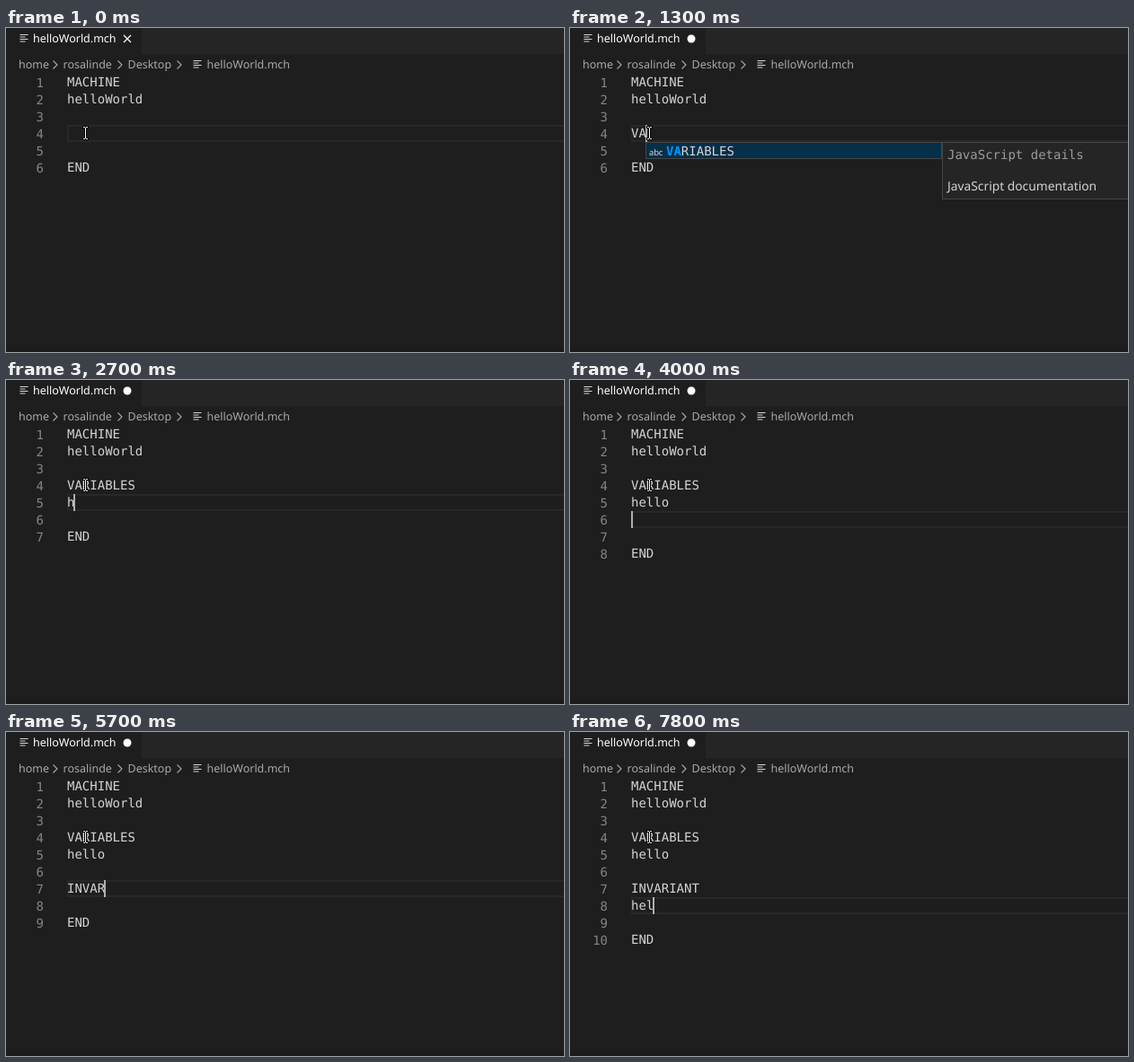
An HTML page for the animation above (8 s loop, 621x361 px).

```html
<!DOCTYPE html>
<html lang="en">
<head>
<meta charset="utf-8">
<title>Editor</title>
<style>
html, body { margin: 0; width: 100%; height: 100%; overflow: hidden; background: #1e1e1e; }
#stage { position: absolute; left: 0; top: 0; width: 621px; height: 361px; overflow: hidden; text-rendering: geometricPrecision; }
#stage div, #stage svg { position: absolute; }
.mono { font: 14px/19px "DejaVu Sans Mono", monospace; color: #d4d4d4; white-space: pre; }
.ui { font: 12.5px/22px "Noto Sans", sans-serif; color: #a9a9a9; white-space: pre; }
.crumb { top: 30px; }
#tabs { left: 151px; top: 0; width: 470px; height: 29px; background: #252526; }
#foot { left: 0; top: 356px; width: 621px; height: 5px; background: #1b1b1b; }
#active { left: 68px; width: 570px; height: 19px; box-sizing: border-box; border: 2px solid #282828; }
#nums { left: 0; top: 53px; width: 42px; text-align: right; color: #858585; }
#text { left: 68px; top: 52px; }
#caret { width: 2px; height: 19px; background: #aeafad; }
#popup { top: 127px; }
#list { left: 0; top: 0; width: 330px; height: 19px; box-sizing: border-box; border: 1px solid #454545; background: #062f4a; }
#list b { color: #0097fb; }
#abc { left: 3px; top: 1px; font: 9.5px/19px "Noto Sans", sans-serif; letter-spacing: -.2px; color: #d4d4d4; }
#word { left: 22px; top: 1px; }
#info { left: 330px; top: 0; width: 330px; height: 64px; box-sizing: border-box; border: 1px solid #454545; background: #252526; }
</style>
</head>
<body>
<div id="stage">
  <div id="tabs"></div>
  <div id="foot"></div>
  <div class="ui" style="left:30px;top:1px;color:#fff">helloWorld.mch</div>
  <div class="ui crumb" style="left:14px">home</div>
  <div class="ui crumb" style="left:63.5px">rosalinde</div>
  <div class="ui crumb" style="left:135.5px">Desktop</div>
  <div class="ui crumb" style="left:223.5px">helloWorld.mch</div>
  <svg width="621" height="361" fill="none">
    <defs>
      <path id="file" d="M0 .5h9M0 3h6M0 5.5h9M0 8h6"/>
      <path id="chev" d="M-2.5 -4.5L2 0L-2.5 4.5"/>
    </defs>
    <g stroke="#d4d7d6">
      <use href="#file" x="15.5" y="7"/>
      <use href="#file" x="208.5" y="36"/>
    </g>
    <g stroke="#a9a9a9" stroke-width="1.1">
      <use href="#chev" x="55" y="41"/>
      <use href="#chev" x="127" y="41"/>
      <use href="#chev" x="193" y="41"/>
    </g>
    <path id="close" d="M131 8l8 8M139 8l-8 8" stroke="#fff" stroke-width="1.2"/>
    <circle id="dot" cx="135" cy="12" r="4.5" fill="#fff"/>
  </svg>
  <div id="active"></div>
  <div id="nums" class="mono"></div>
  <div id="text" class="mono"></div>
  <div id="caret"></div>
  <div id="popup">
    <div id="list">
      <div id="abc">abc</div>
      <div id="word" class="mono"><b></b><span></span></div>
    </div>
    <div id="info">
      <div class="mono" style="left:5px;top:5px;color:#9b9b9b">JavaScript details</div>
      <div class="ui" style="left:5px;top:38px;font-size:13.8px;color:#d4d4d4">JavaScript documentation</div>
    </div>
  </div>
  <svg width="621" height="361" fill="none" stroke-linecap="square">
    <defs>
      <path id="beam" d="M86.5 110.5h1M89.5 110.5h1M88.5 111.5v11M86.5 123.5h1M89.5 123.5h1"/>
    </defs>
    <use href="#beam" stroke="#000" stroke-width="3"/>
    <use href="#beam" stroke="#fff"/>
  </svg>
</div>
<script>
const LOOP = 8000, BLINK = 500, ROW = 19, TOP = 51, LEFT = 68, CHAR = 8.43;
const WORD = 'VARIABLES';
const keys = [
  [1200, 'V'], [1300, 'A'], [1800, 'RIABLES'], [2200, '\n'],
  [2700, 'h'], [2900, 'e'], [3100, 'l'], [3200, 'l'], [3700, 'o'],
  [4000, '\n'], [4200, '\n'],
  [4800, 'I'], [5200, 'N'], [5400, 'V'], [5500, 'A'], [5700, 'R'],
  [6000, 'I'], [6200, 'A'], [6500, 'N'], [6700, 'T'], [7200, '\n'],
  [7500, 'h'], [7700, 'e'], [7800, 'l']
];
const $ = id => document.getElementById(id);
const show = (el, on) => { el.style.visibility = on ? 'visible' : 'hidden'; };

function render(t) {
  const typed = keys.filter(k => k[0] <= t);
  const last = typed.length ? typed[typed.length - 1][0] : -800;
  const input = typed.map(k => k[1]).join('').split('\n');
  const lines = ['MACHINE', 'helloWorld', '', ...input, '', 'END'];
  const row = 2 + input.length;
  const col = input[input.length - 1].length;
  const y = TOP + row * ROW;

  $('text').textContent = lines.join('\n');
  $('nums').textContent = lines.map((_, i) => i + 1).join('\n');
  $('active').style.top = $('caret').style.top = y + 'px';
  $('caret').style.left = Math.max(LEFT, Math.round(LEFT - 1 + col * CHAR)) + 'px';
  show($('caret'), Math.floor((t - last) / BLINK) % 2 === 0);

  show($('close'), !typed.length);
  show($('dot'), typed.length);

  const open = typed.length > 0 && t < 1800;
  show($('popup'), open);
  if (open) {
    $('popup').style.left = Math.floor(LEFT + col * CHAR) + 'px';
    const [hit, rest] = $('word').children;
    hit.textContent = WORD.slice(0, col);
    rest.textContent = WORD.slice(col);
  }
}

const start = performance.now();
function tick() {
  render((performance.now() - start) % LOOP);
  requestAnimationFrame(tick);
}
tick();
</script>
</body>
</html>
```
